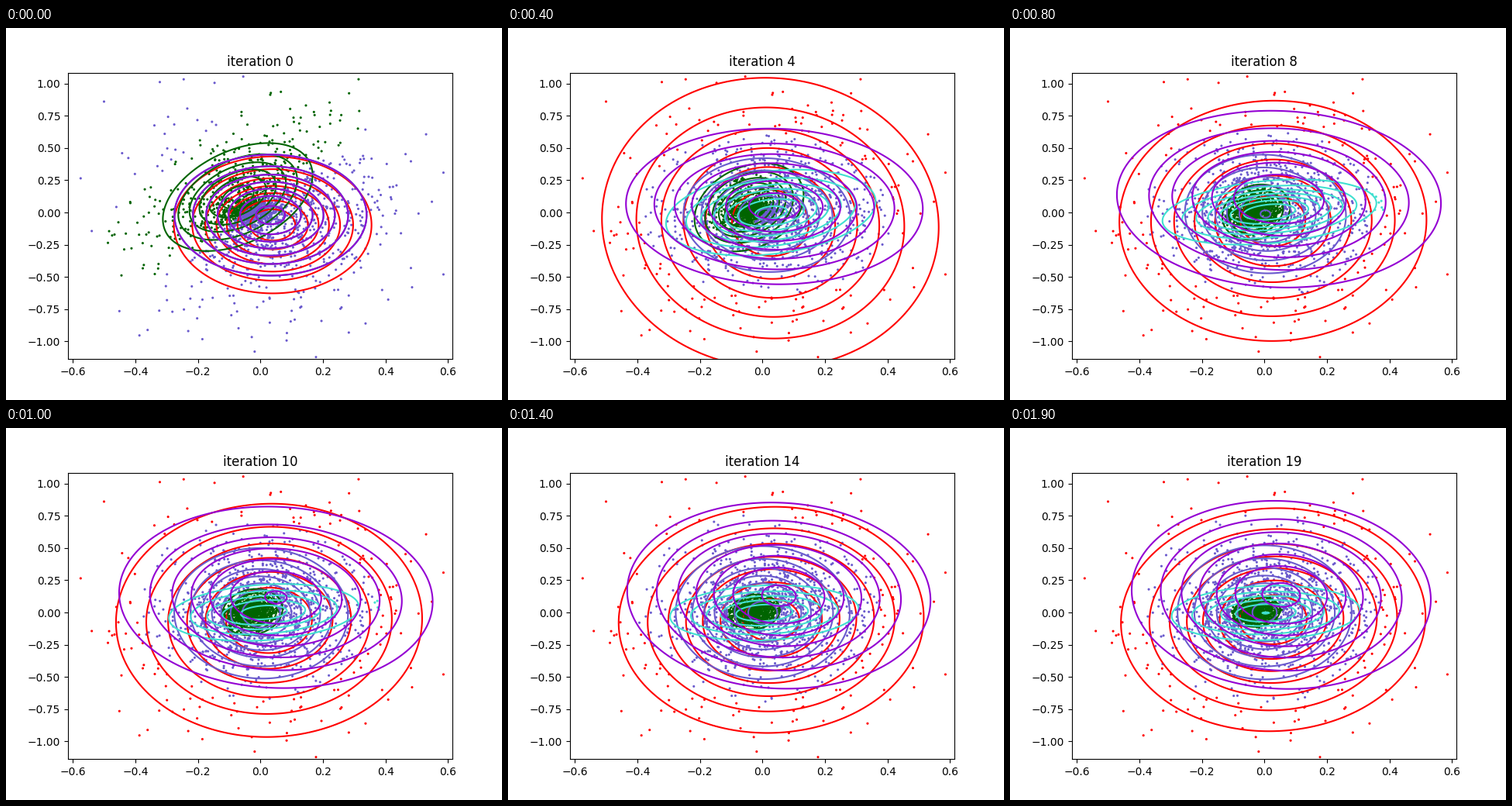
These frames come from a looping animation (640x480 px, 2000 ms). A matplotlib script:

```python
import numpy as np
import matplotlib.pyplot as plt
from matplotlib.animation import FuncAnimation

FRAMES = 20
SETTLE = 4.0  # iterations for a component to relax towards its rest pose
XLIM, YLIM = (-0.6158, 0.6138), (-1.1365, 1.0847)


class Component:
    """Gaussian that moves steadily to a peak pose, then relaxes to rest.

    A pose is mean x, mean y, sigma x, sigma y, correlation.
    """

    def __init__(self, color, weight, start, peak, rest, peak_at=6):
        self.color, self.weight, self.peak_at = color, weight, peak_at
        self.start, self.peak, self.rest = map(np.array, (start, peak, rest))

    def pose(self, i):
        if i < self.peak_at:
            return self.start + (self.peak - self.start) * i / self.peak_at
        fade = np.exp((self.peak_at - i) / SETTLE)
        return self.rest + (self.peak - self.rest) * fade

    def density(self, x, y, i):
        mx, my, sx, sy, rho = self.pose(i)
        u, v, k = (x - mx) / sx, (y - my) / sy, 1 - rho**2
        q = (u * u + v * v - 2 * rho * u * v) / k
        return np.exp(-q / 2) / (2 * np.pi * sx * sy * np.sqrt(k))


BLOB = (.032, -.02, .154, .235, 0)
MIX = [
    Component("red", .10, (.039, -.096, .156, .262, 0),
              (.025, -.081, .277, .579, -.03), (.028, -.055, .240, .424, .03), 4),
    Component("darkgreen", .25, (-.073, .12, .1235, .216, .41),
              (-.028, 0, .069, .148, .2), (-.025, .006, .036, .055, .1)),
    Component("slateblue", .45, BLOB,
              (.005, -.02, .133, .23, -.05), (0, .002, .14, .262, 0)),
    Component("turquoise", .08, BLOB,
              (.024, .009, .175, .133, .38), (.003, -.004, .158, .111, .1)),
    Component("darkviolet", .015, BLOB,
              (.041, .081, .2786, .3347, -.05), (.054, .139, .239, .368, -.05)),
]
COLORS = np.array([c.color for c in MIX])


def make_points():
    rng = np.random.default_rng(7)

    def cloud(n, mx, my, sx, sy, rho=0):
        c = rho * sx * sy
        return rng.multivariate_normal((mx, my), [[sx**2, c], [c, sy**2]], n)

    core = cloud(600, -.026, .003, .042, .058, .1)
    body = cloud(950, .01, 0, .135, .26)
    wide = cloud(160, .04, .02, .19, .1, .25)
    rim = cloud(500, .02, -.02, .22, .45)
    outside = (rim[:, 0] / .33) ** 2 + (rim[:, 1] / .68) ** 2 > .95
    return np.vstack([core, body, wide, rim[outside]])


def labels(i):
    x, y = POINTS.T
    if i == 0:  # first guess: a diagonal band against the rest
        band = (y > .09 + 1.72 * x) & (y < .975 + 2.12 * x)
        return np.where(band, 1, 2)
    return np.argmax([c.weight * c.density(x, y, i) for c in MIX], axis=0)


POINTS = make_points()
GRID = np.meshgrid(np.linspace(-.75, .75, 260), np.linspace(-1.4, 1.3, 260))

fig, ax = plt.subplots(figsize=(6.4, 4.8), dpi=100)


def draw(i):
    ax.clear()
    ax.scatter(*POINTS.T, s=5, c=COLORS[labels(i)], linewidths=0)
    for c in MIX:
        ax.contour(*GRID, c.density(*GRID, i), colors=[c.color], linewidths=1.5)
    ax.set_xlim(XLIM)
    ax.set_ylim(YLIM)
    ax.set_title(f"iteration {i}")
    return []


anim = FuncAnimation(fig, draw, frames=FRAMES, interval=100,
                     init_func=lambda: draw(0), repeat=True, repeat_delay=0)
plt.show()
```
